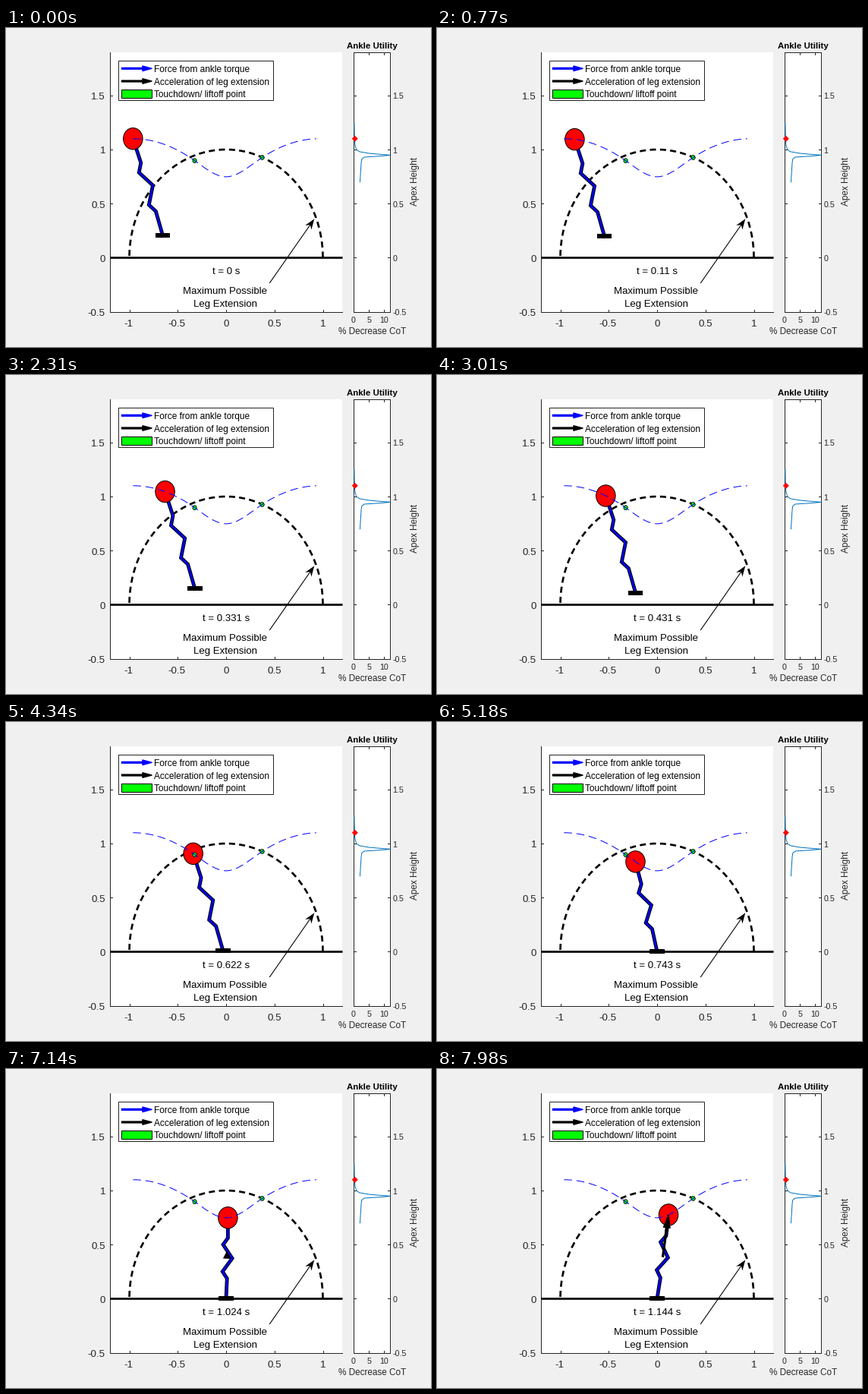
Recreate the animation shown at these times as a matplotlib script. Size 560 by 420 pixels, loop 8000 ms.

```python
import numpy as np
import matplotlib.pyplot as plt
from matplotlib.animation import FuncAnimation
from matplotlib.patches import Ellipse, Polygon, Rectangle

W, H, DPI = 560, 420, 100
PT = 72 / DPI                      # points per pixel
STEP_MS, TICK_MS, LOOP_MS = 70, 20, 8000
DT = 0.0100345                     # simulated seconds per step
DARK = "#262626"
BLUE = "#0000ff"

X0, APEX = -0.962, 1.1             # start of the flight
TD_X, TD_Y, TD_T = -0.325, 0.897, 0.637
LO_X, LO_Y = 0.3725, 0.9265
LOW = 0.748                        # lowest point of the stance
PATH_END = 0.932
FOOT_DX = 0.308
PUSH_T, PUSH_LEN = 1.0, 0.144

# zigzag leg: fraction along the leg, sideways offset
LEG_S = np.array([0, 0.25, 1 / 3, 0.5, 2 / 3, 0.75, 1])
LEG_N = np.array([0, 0.005, -0.043, 0.054, -0.043, 0.005, 0])

fig = plt.figure(figsize=(W / DPI, H / DPI), dpi=DPI, facecolor="#f0f0f0")
ax = fig.add_axes([0, 0, 1, 1])
ax.set_xlim(0, W)
ax.set_ylim(H, 0)
ax.axis("off")


def sx(x):
    return 290 + 127.5 * np.asarray(x)


def sy(y):
    return 302.4 - 142.4 * np.asarray(y)


def ux(u):
    return 458 + 4.03 * np.asarray(u)


def line(x, y, color=DARK, width=1.0, z=2, **kw):
    return ax.plot(x, y, color=color, lw=width * PT, zorder=z, **kw)[0]


def label(x, y, s, size, color="black", ha="center", **kw):
    return ax.text(x, y + 0.36 * size, s, fontsize=size * PT, color=color,
                   ha=ha, va="baseline", family="Liberation Sans",
                   zorder=9, **kw)


def box(x0, y0, x1, y1, face="white", edge="none", z=1):
    ax.add_patch(Rectangle((x0, y0), x1 - x0, y1 - y0, facecolor=face,
                           edgecolor=edge, lw=PT, zorder=z))


def arrow_points(tail, tip, shaft, head, half, notch=0.0):
    tail, tip = np.array(tail, float), np.array(tip, float)
    d = tip - tail
    size = max(np.hypot(*d), 1e-6)
    d = d / size
    n = np.array([-d[1], d[0]])
    head = min(head, size)
    base = tip - head * d
    neck = base + notch * d
    s = shaft / 2
    return [tail + s * n, neck + s * n, base + half * n, tip,
            base - half * n, neck - s * n, tail - s * n]


def arrow(points, color, z, edge=0.0):
    patch = Polygon(points, closed=True, facecolor=color, edgecolor=color,
                    lw=edge * PT, joinstyle="round", zorder=z)
    return ax.add_patch(patch)


def hermite(s, y0, y1, m0, m1):
    return (y0 * (1 - 3 * s**2 + 2 * s**3) + m0 * s * (1 - s)**2
            + y1 * (3 * s**2 - 2 * s**3) + m1 * s**2 * (s - 1))


def height(x):
    """Height of the body above the ground along its path."""
    x = np.asarray(x, float)
    down = hermite((x - TD_X) / -TD_X, TD_Y, LOW, 0.637 * TD_X, 0)
    up = hermite(x / LO_X, LOW, LO_Y, 0, 0.589 * LO_X)
    return np.select(
        [x < TD_X, x < 0, x < LO_X],
        [APEX - (x - X0)**2 / 2, down, up],
        APEX - (-X0 - x)**2 / 2)


def body_x(t):
    if t < TD_T:
        return X0 + t
    s = t - TD_T
    return TD_X + s - 0.4085 * s**2 + 0.3145 * s**3


def draw_main_axes():
    box(137, 32, 443, 374)
    line([137, 137, 443], [32, 374, 374])
    for v in (-1, -0.5, 0, 0.5, 1):
        line([sx(v)] * 2, [374, 371])
        label(sx(v) - (1 if v < 0 else 0), 388, f"{v:g}", 13.33, DARK)
    for v in (-0.5, 0, 0.5, 1, 1.5):
        line([137, 140], [sy(v)] * 2)
        label(131, sy(v) + 0.7, f"{v:g}", 13.33, DARK, "right")

    a = np.linspace(0, np.pi, 200)
    line(sx(np.cos(a)), sy(np.sin(a)), "black", 2.67, 3,
         linestyle=(0, (3, 2)), dash_capstyle="butt")
    line([137, 443], [sy(0)] * 2, "black", 2.7, 3, solid_capstyle="butt")

    x = np.linspace(X0, PATH_END, 300)
    line(sx(x), sy(height(x)), BLUE, 1, 8,
         linestyle=(0, (10.5, 6)), dash_capstyle="butt")
    for px, py in ((TD_X, TD_Y), (LO_X, LO_Y)):
        ax.add_patch(Ellipse((sx(px), sy(py)), 5.2, 5.8, facecolor="#00ff00",
                             edgecolor="black", lw=0.85 * PT, zorder=7))

    label(288.7, 345.5, "Maximum Possible", 13.2)
    label(288.7, 362.5, "Leg Extension", 13.2)
    arrow(arrow_points((347.2, 336), (406.3, 251.3), 1.1, 14, 5, 4),
          "black", 6)


def draw_legend():
    box(148, 43, 352, 95, edge=DARK, z=9)
    rows = ((53.3, BLUE, "Force from ankle torque"),
            (70, "black", "Acceleration of leg extension"))
    for y, color, text in rows:
        arrow(arrow_points((152.5, y), (192, y), 1.7, 12, 3.2), color, 10, 1.5)
        label(195, y + 0.5, text, 11.95, ha="left")
    box(152, 81, 192, 92, "#00ff00", "black", 10)
    label(195, 87, "Touchdown/ liftoff point", 11.95, ha="left")


def draw_side_axes():
    box(458, 32, 506, 374)
    line([458, 506, 506, 458, 458], [32, 32, 374, 374, 32])
    for v in (0, 5, 10):
        line([ux(v)] * 2, [374, 371])
        line([ux(v)] * 2, [32, 35])
        label(ux(v), 383.7, f"{v}", 10.67, DARK)
    for v in (-0.5, 0, 0.5, 1, 1.5):
        line([458, 461], [sy(v)] * 2)
        line([506, 503], [sy(v)] * 2)
        label(509.7, sy(v) + 0.7, f"{v:g}", 10.67, DARK, "left")

    cost = [0.1, 0.2, 0.4, 0.8, 1.8, 4.9, 8, 12, 8, 3.4, 2.6, 2.4, 2]
    apex = [1.25, 1.1, 1.04, 1, 0.98, 0.965, 0.957, 0.948, 0.938, 0.93,
            0.913, 0.88, 0.7]
    line(ux(cost) + 0.4, sy(apex), "#0072bd", 1, 3)
    cx, cy = 459.8, sy(APEX)
    ax.add_patch(Polygon([(cx - 4, cy), (cx, cy - 4), (cx + 4, cy),
                          (cx, cy + 4)], color="red", lw=0, zorder=5))
    label(482.5, 23, "Ankle Utility", 11.5, weight="bold")
    label(482.5, 398.5, "% Decrease CoT", 11.73, DARK)
    ax.text(545.2, 202.5, "Apex Height", fontsize=11.73 * PT, color=DARK,
            rotation=90, ha="right", va="center", family="Liberation Sans")


draw_main_axes()
draw_legend()
draw_side_axes()

leg_edge = line([], [], "black", 4.8, 4, solid_joinstyle="miter")
leg_core = line([], [], BLUE, 2.6, 4.1, solid_joinstyle="miter")
foot = ax.add_patch(Rectangle((0, 0), 19.5, 6, color="black", lw=0, zorder=5))
head = ax.add_patch(Ellipse((0, 0), 25.5, 28.4, facecolor="red",
                            edgecolor="black", lw=PT, zorder=6))
push = arrow([(0, 0)] * 3, "black", 8.5, 1.2)
clock = label(290, 318.8, "", 13.2)


def update(i):
    step = (i * TICK_MS + TICK_MS // 2) // STEP_MS
    t = step * DT
    x = body_x(t)
    top = np.array([x, float(height(x))])
    if t < TD_T:
        toe = top + [FOOT_DX, -TD_Y]
    else:
        toe = np.zeros(2)

    leg = toe - top
    along = leg / np.hypot(*leg)
    side = np.array([-along[1], along[0]])
    pts = top + np.outer(LEG_S, leg) + np.outer(LEG_N, side)
    for part in (leg_edge, leg_core):
        part.set_data(sx(pts[:, 0]), sy(pts[:, 1]))
    foot.set_xy((sx(toe[0]) - 9.75, sy(toe[1]) - 3))
    head.set_center((sx(top[0]), sy(top[1])))

    grow = (t - PUSH_T) / PUSH_LEN
    push.set_visible(grow > 0)
    if grow > 0:
        mid = top + leg / 2
        tip = mid - leg / 2 * grow
        push.set_xy(arrow_points((sx(mid[0]), sy(mid[1])),
                                 (sx(tip[0]), sy(tip[1])), 2, 17, 4.4))
    clock.set_text(f"t = {round(t, 3):g} s")


anim = FuncAnimation(fig, update, frames=LOOP_MS // TICK_MS, interval=TICK_MS,
                     init_func=lambda: update(0), repeat=True, repeat_delay=0,
                     cache_frame_data=False)
plt.show()
```
